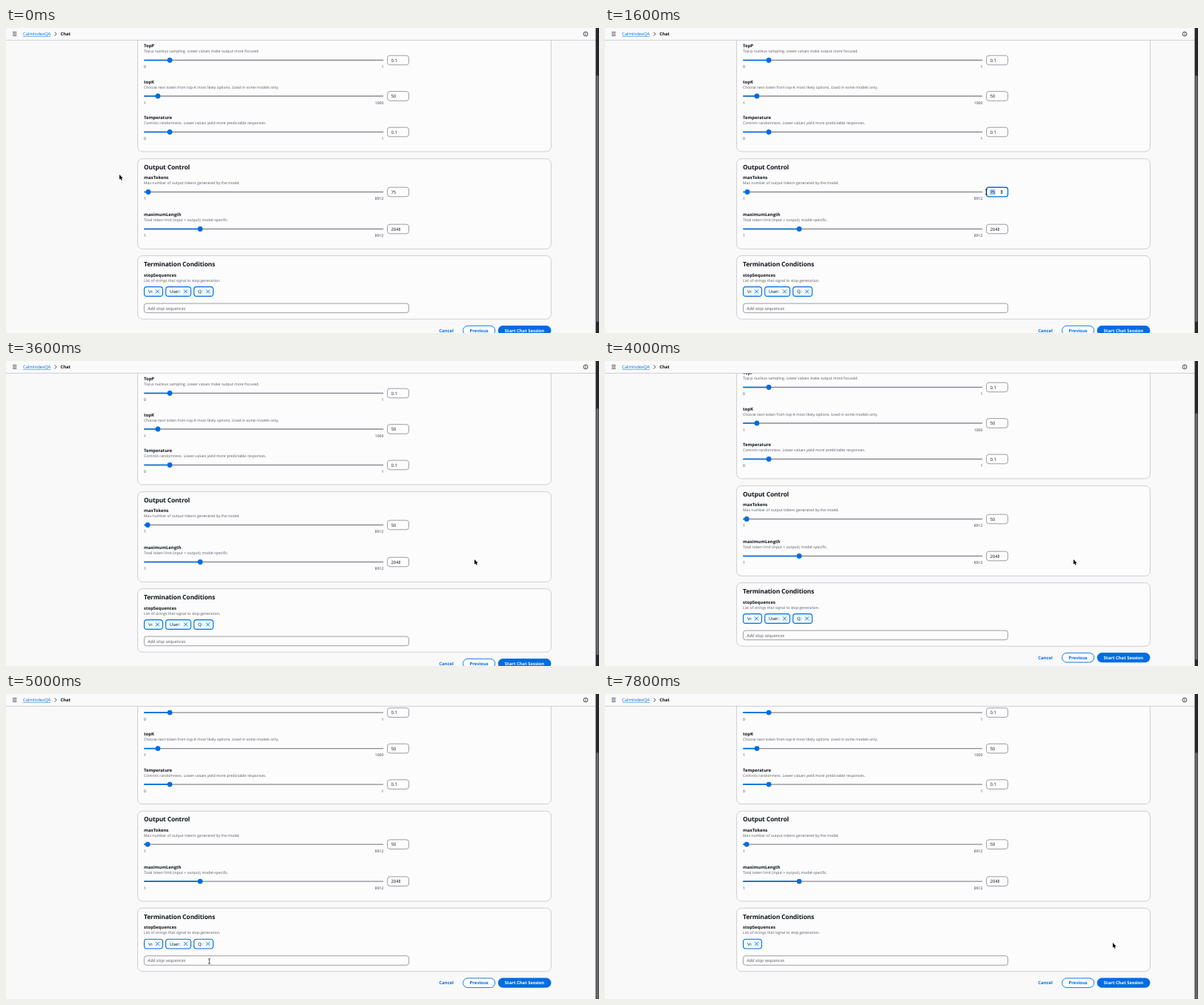
Recreate the animation shown at these times as an HTML page. Size 800 by 412 pixels, loop 8 s.

```html
<!DOCTYPE html>
<html lang="en">
<head>
<meta charset="utf-8">
<title>Chat settings</title>
<style>
  html, body { margin: 0; width: 100%; height: 100%; overflow: hidden; background: #f9f9fa; }
  svg { display: block; width: 100vw; height: 100vh; }
  text { font: 5.9px "Open Sans", sans-serif; fill: #0f141a; text-rendering: geometricPrecision; white-space: pre; }
  .heading { font-size: 8.42px; font-weight: 700; letter-spacing: -.015em; }
  .bold { font-weight: 700; }
  .small { font-size: 5.07px; fill: #565a63; }
  .limit { font-size: 5.07px; fill: #30343d; }
  .hint { font-style: italic; fill: #5b5f68; }
  .link { fill: #006ce0; }
  .white { fill: #fff; }
  .end { text-anchor: end; }
  .mid { text-anchor: middle; }
  .card { fill: #fcfcfd; stroke: #c6c6cd; stroke-width: .85; }
  .field { fill: #fdfdfd; stroke: #8c8c94; stroke-width: .85; }
  .focus { stroke: #006ce0; stroke-width: 1.35; }
  .token { fill: #f0fbff; stroke: #006ce0; stroke-width: 1.1; }
  .cross { stroke: #006ce0; stroke-width: .95; fill: none; }
  .icon { stroke: #2a2f38; stroke-width: .85; fill: none; }
</style>
</head>
<body>
<svg id="stage" viewBox="0 0 800 412" preserveAspectRatio="none"></svg>
<script>
const LOOP = 8000, STEP = 200;
const BLUE = '#006ce0';
const stage = document.getElementById('stage');

function add(parent, tag, attrs, content = '') {
  const node = document.createElementNS('http://www.w3.org/2000/svg', tag);
  for (const key in attrs) node.setAttribute(key, attrs[key]);
  node.textContent = content;
  parent.append(node);
  return node;
}
const group = parent => add(parent, 'g', {});
const text = (parent, x, y, content, cls = '') => add(parent, 'text', { x, y, class: cls }, content);
const box = (parent, x, y, width, height, rx, cls) =>
  add(parent, 'rect', { x, y, width, height, rx, class: cls });
const path = (parent, d, attrs) => add(parent, 'path', { d, ...attrs });
const show = (node, on) => node.setAttribute('visibility', on ? 'visible' : 'hidden');

const page = group(stage);

// Each setting: y is the middle of its label.
function setting(y, name, note, min, max, value) {
  const line = y + 19;
  text(page, 186, y + 1.9, name, 'bold');
  text(page, 186, y + 8.8, note, 'small');
  add(page, 'rect', { x: 186, y: line - .7, width: 323.3, height: 1.4, rx: .7, fill: '#8c8c94' });
  const fill = add(page, 'rect', { x: 186, y: line - .85, height: 1.7, rx: .8, fill: BLUE });
  const knob = add(page, 'circle', { cy: line, r: 3.4, fill: BLUE });
  text(page, 186, y + 29.9, min, 'limit');
  text(page, 509.4, y + 29.9, max, 'limit end');
  const field = box(page, 514.6, line - 6.3, 28.9, 12.6, 3.4, 'field');
  const mark = add(page, 'rect', { x: 519.3, y: line - 3.6, width: 7.2, height: 7.4, fill: '#a9d0fb', visibility: 'hidden' });
  const clip = add(page, 'svg', { x: 519.5, y: line - 6, width: 12.6, height: 12 });
  const digits = text(clip, 0, 8.3, '');
  const set = v => {
    const x = 189.35 + (v - min) / (max - min) * 316.3;
    knob.setAttribute('cx', x);
    fill.setAttribute('width', x - 186);
    digits.textContent = v;
  };
  set(value);
  return { line, field, mark, set };
}

box(page, 177.6, -60, 557.8, 227, 6.7, 'card');
setting(24.5, 'TopP', 'Top-p nucleus sampling. Lower values make output more focused.', 0, 1, .1);
setting(73, 'topK', 'Choose next token from top-K most likely options. Used in some models only.', 1, 1000, 50);
setting(121.5, 'Temperature', 'Controls randomness. Lower values yield more predictable responses.', 0, 1, .1);

box(page, 177.6, 176.6, 557.8, 121.8, 6.7, 'card');
text(page, 186, 190.9, 'Output Control', 'heading');
const tokensMax = setting(202.5, 'maxTokens', 'Max number of output tokens generated by the model.', 1, 8912, 75);
setting(252.5, 'maximumLength', 'Total token limit (input + output); model-specific.', 1, 8912, 2048);

const caret = add(page, 'rect', { x: 526.5, y: tokensMax.line - 3.5, width: .6, height: 7, fill: '#0f141a' });
const spinner = group(page);
add(spinner, 'rect', { x: 532.6, y: 218, width: 5.2, height: 7.2, rx: 1.4, fill: '#efeff0' });
path(spinner, 'M533.6 220.9l1.6-2 1.6 2zM533.6 222.3l1.6 2 1.6-2z', { fill: '#30343d' });

box(page, 177.6, 307.6, 557.8, 85.6, 6.7, 'card');
text(page, 186, 322.3, 'Termination Conditions', 'heading');
text(page, 186, 335.5, 'stopSequences', 'bold');
text(page, 186, 342.8, 'List of strings that signal to stop generation.', 'small');

function token(x, width, label) {
  const g = group(page), cx = x + width - 7;
  box(g, x, 349.6, width, 12.8, 3.4, 'token');
  text(g, x + 5.3, 358.1, label);
  path(g, `M${cx - 2.4} 353.5l4.8 4.8m0-4.8l-4.8 4.8`, { class: 'cross' });
  return g;
}
token(186.5, 24.9, '\\n');
const userToken = token(215.6, 33.8, 'User:');
const questionToken = token(253.6, 25.9, 'Q:');

box(page, 186.4, 372.1, 357.1, 12.6, 3.4, 'field');
text(page, 191.2, 380.5, 'Add stop sequences', 'hint');

text(page, 594, 410.8, 'Cancel', 'bold link mid');
add(page, 'rect', { x: 616.6, y: 402.3, width: 43.2, height: 12.7, rx: 6.35, fill: '#fdfdfd', stroke: BLUE, 'stroke-width': .9 });
text(page, 638.2, 410.8, 'Previous', 'bold link mid');
add(page, 'rect', { x: 663.8, y: 402, width: 71.6, height: 13.2, rx: 6.6, fill: BLUE });
text(page, 699.5, 410.8, 'Start Chat Session', 'bold white mid');

// Fixed header and scrollbar
add(stage, 'rect', { width: 800, height: 16, fill: '#fafafb' });
add(stage, 'rect', { y: 16, width: 800, height: .8, fill: '#c6c6cd' });
path(stage, 'M9 5.7h5.4M9 8h5.4M9 10.3h5.4', { class: 'icon' });
text(stage, 23, 10.1, 'CalmIndexQA', 'link');
add(stage, 'rect', { x: 23, y: 11.1, width: 37.3, height: .5, fill: BLUE });
path(stage, 'M65.6 5.4l2.6 2.6-2.6 2.6', { class: 'icon' });
text(stage, 73.4, 10.1, 'Chat', 'bold');
add(stage, 'circle', { cx: 782, cy: 8, r: 2.9, class: 'icon' });
path(stage, 'M782 7.5v2.1M782 6.1v.8', { class: 'icon' });

add(stage, 'rect', { x: 795.5, width: 4.5, height: 412, fill: '#28282b' });
const thumb = add(stage, 'rect', { x: 796.3, width: 3.2, height: 333, rx: 1.6, fill: '#69696c' });

const arrow = path(stage, 'M0 0V6.7L1.5 5.3 2.6 7.8 3.8 7.3 2.7 4.9H4.7Z',
  { fill: '#000', stroke: '#fff', 'stroke-width': .6, 'paint-order': 'stroke' });
const beam = path(stage, 'M-1.3 -3.4Q0 -3.4 0 -2.6Q0 -3.4 1.3 -3.4M0 -2.6V2.6M-1.3 3.4Q0 3.4 0 2.6Q0 3.4 1.3 3.4',
  { fill: 'none', stroke: '#111', 'stroke-width': .8 });

// Tables of [time, value...]
const mouse = [
  [0, 153, 198], [200, 153, 198], [1000, 526, 222], [1200, 526, 222], [1400, 514.3, 221.5],
  [2800, 514.3, 221.5], [3600, 632, 268], [4200, 632, 268], [5000, 274.3, 361],
  [5400, 272, 338], [5800, 272, 338], [6000, 242, 338], [6400, 242, 338],
  [6600, 269, 338.5], [7400, 685, 336], [8000, 685, 336]
];
const scroll = [[0, 0], [3800, 0], [4000, 8], [4200, 16], [4400, 18.4], [8000, 18.4]];

function at(table, t) {
  const i = table.findIndex(row => row[0] > t);
  const a = table[i - 1], b = table[i];
  const p = (t - a[0]) / (b[0] - a[0]);
  const k = p * p * (3 - 2 * p);
  return a.slice(1).map((v, n) => v + (b[n + 1] - v) * k);
}

function draw(now) {
  const t = Math.floor(now % LOOP / STEP) * STEP;
  const [shift] = at(scroll, t), [x, y] = at(mouse, t);
  page.setAttribute('transform', `translate(0 ${-shift})`);
  thumb.setAttribute('y', 64 + shift * .815);

  const focused = t >= 1200 && t < 3600;
  tokensMax.set(t < 1800 ? 75 : t < 2000 ? 5 : 50);
  tokensMax.field.setAttribute('class', focused ? 'field focus' : 'field');
  show(tokensMax.mark, t >= 1400 && t < 1800);
  show(caret, focused && t >= 2000);
  show(spinner, focused);
  show(questionToken, t < 5600);
  show(userToken, t < 6200);

  const typing = t >= 1800 && t < 3000;
  const overText = (t >= 1000 && t < 1800) || t === 5000;
  show(arrow, !typing && !overText);
  show(beam, overText);
  for (const pointer of [arrow, beam]) pointer.setAttribute('transform', `translate(${x} ${y})`);
}

const start = performance.now();
function tick() {
  draw(performance.now() - start);
  requestAnimationFrame(tick);
}
tick();
</script>
</body>
</html>
```
